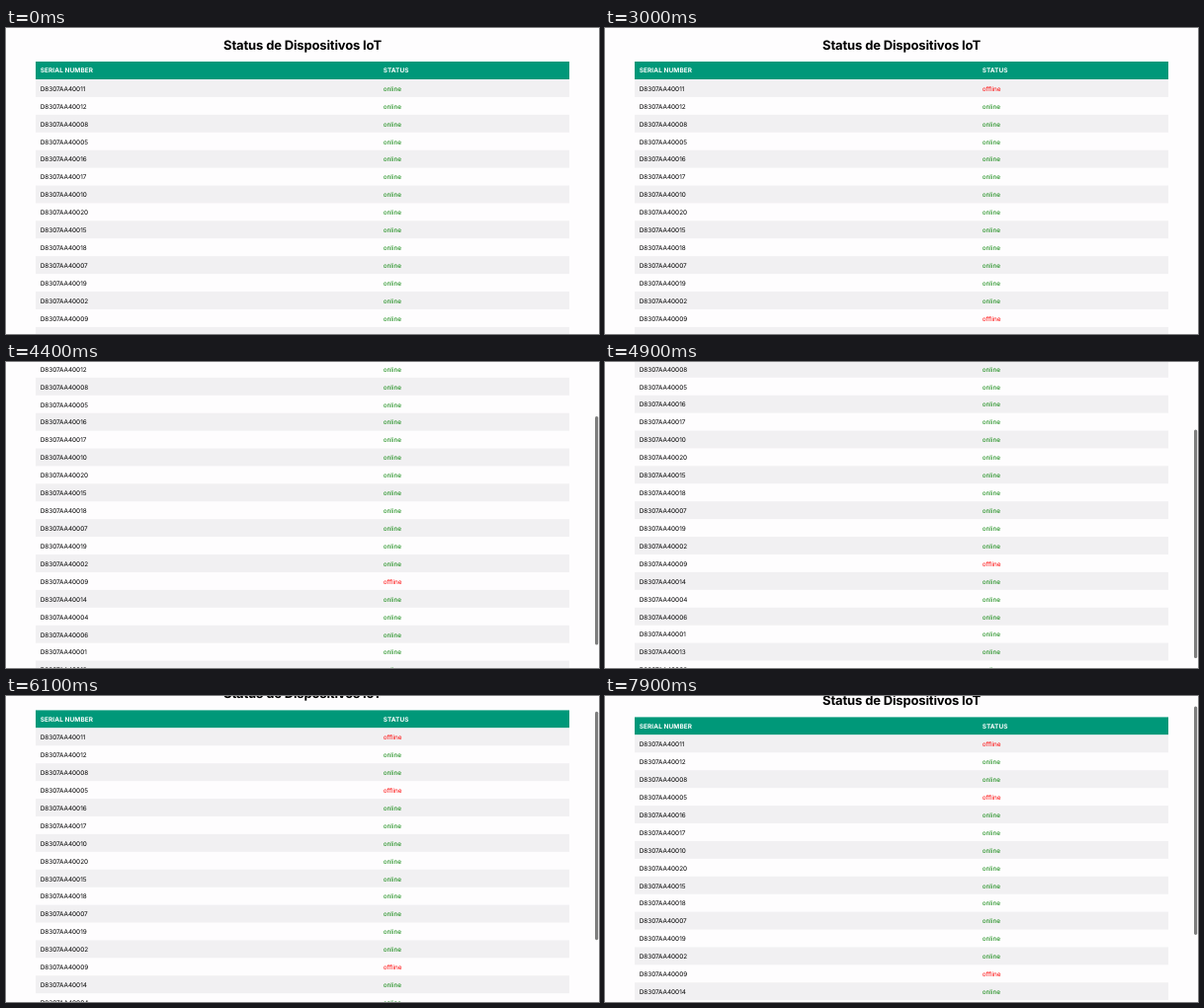
Write an HTML page that moves like this. It is 600x310 px and loops after 8000 ms.

```html
<!DOCTYPE html>
<html lang="es">
<head>
<meta charset="utf-8">
<title>Status de Dispositivos IoT</title>
<style>
  html, body { margin: 0; width: 100%; height: 100%; overflow: hidden; background: #fefdfe; }
  svg { display: block; width: 600px; height: 310px; }
  text { font: 400 6.4px Inter, "Liberation Sans", sans-serif; text-rendering: geometricPrecision; fill: #000; }
  .title { font-size: 13px; font-weight: 700; letter-spacing: -.15px; text-anchor: middle; }
  .head { font-size: 6.45px; font-weight: 700; letter-spacing: .1px; fill: #fff; }
  .online { fill: #008000; }
  .offline { fill: #f00; }
</style>
</head>
<body>
<svg viewBox="0 0 600 310">
  <g id="page">
    <text class="title" x="300" y="21.8">Status de Dispositivos IoT</text>
    <rect x="30" y="34" width="540" height="18" fill="#009879"/>
    <text class="head" x="34.7" y="45.3">SERIAL NUMBER</text>
    <text class="head" x="381.7" y="45.3">STATUS</text>
  </g>
  <rect id="thumb" x="596" width="3.2" height="231.5" rx="1.6" fill="#7d7d7d"/>
</svg>
<script>
const LOOP = 8000, STEP = 100, ROW = 17.92, TOP = 52;
const devices = [11, 12, 8, 5, 16, 17, 10, 20, 15, 18, 7, 19, 2, 9, 14, 4, 6, 1, 13, 3];
const offlineAt = { 11: 3000, 9: 3000, 5: 6000 };

// Scroll gestures: start time, then one offset per step.
const gestures = [
  [3800, [3, 13, 25.5, 39, 52, 63, 72, 78, 81]],
  [4800, [84, 90, 95, 99, 101, 102]],
  [5700, [99, 86, 64, 41, 19.6, 9, 4, 1.5, 0]],
  [7600, [0.7, 3, 7, 12.6]]
];
const barShown = [[3800, 7000], [7600, 8000]];

const page = document.getElementById("page");
const thumb = document.getElementById("thumb");

function add(tag, attrs, text = "") {
  const el = document.createElementNS("http://www.w3.org/2000/svg", tag);
  for (const key in attrs) el.setAttribute(key, attrs[key]);
  el.textContent = text;
  return page.appendChild(el);
}

const cells = devices.map((id, i) => {
  const y = TOP + i * ROW;
  if (i % 2 === 0) add("rect", { x: 30, y, width: 540, height: ROW, fill: "#f1f0f2" });
  add("text", { x: 34.7, y: y + 11.8 }, "D8307AA400" + String(id).padStart(2, "0"));
  return add("text", { x: 381.7, y: y + 11.8 });
});

function scrollAt(t) {
  let offset = 0;
  for (const [start, steps] of gestures) {
    if (t < start) break;
    offset = steps[Math.min(steps.length - 1, Math.floor((t - start) / STEP))];
  }
  return offset;
}

function draw(now) {
  const t = now % LOOP;
  const offset = scrollAt(t);
  page.setAttribute("transform", `translate(0 ${-offset})`);
  thumb.setAttribute("y", 1 + offset * 0.75);
  thumb.setAttribute("visibility", barShown.some(([a, b]) => t >= a && t < b) ? "visible" : "hidden");
  cells.forEach((cell, i) => {
    const state = t >= offlineAt[devices[i]] ? "offline" : "online";
    if (cell.textContent === state) return;
    cell.textContent = state;
    cell.setAttribute("class", state);
  });
}

const begin = performance.now();
function tick() {
  draw(performance.now() - begin);
  requestAnimationFrame(tick);
}
tick();
</script>
</body>
</html>
```
